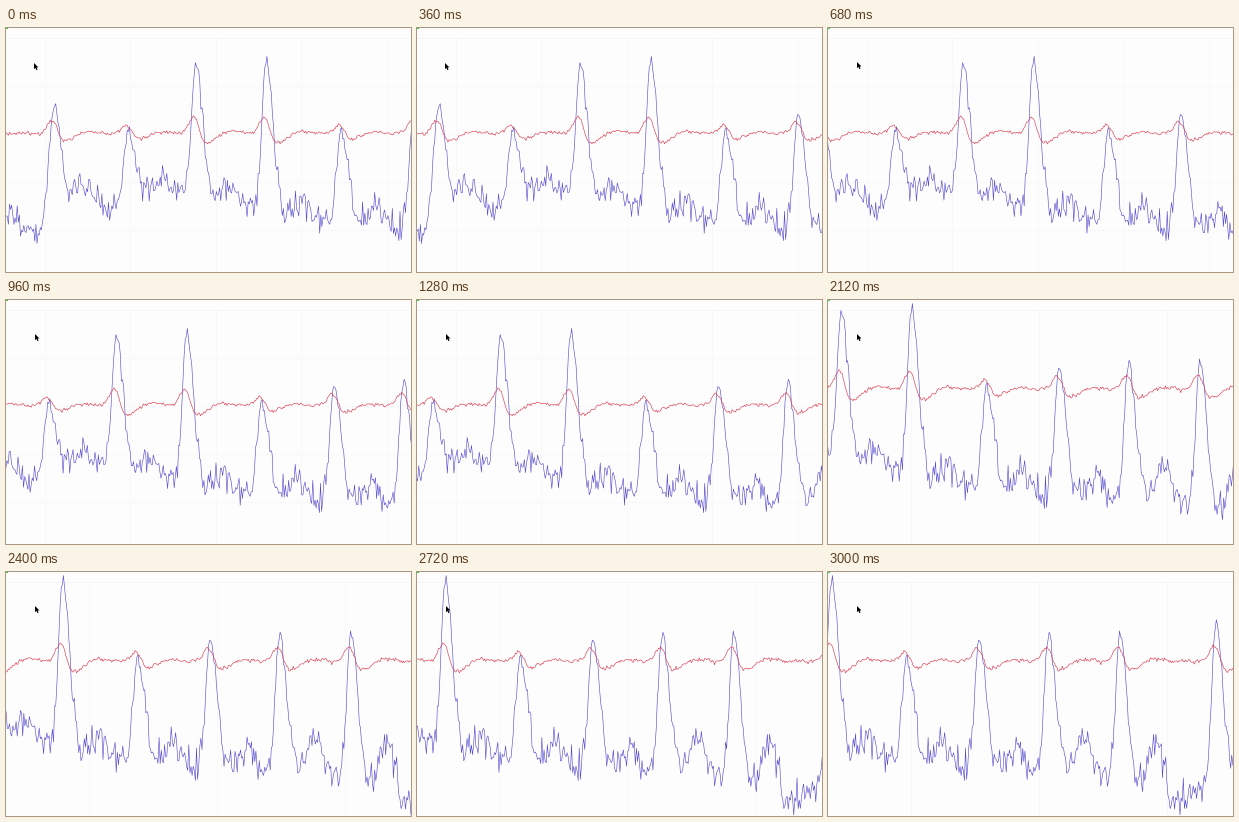
These frames come from a looping animation (405 px wide and 244 px high, 3040 ms). A matplotlib script:

```python
import numpy as np
import matplotlib.pyplot as plt
from matplotlib.animation import FuncAnimation
from matplotlib.patches import Polygon, Rectangle

W, H, DPI = 405, 244, 100
FRAMES, STEP = 76, 40
RESCALE_AT = 1400      # ms, vertical axis jumps to a tighter range
POINTER_AT = 680       # ms, pointer nudges by one pixel
PX = 72 / DPI
RED_LEVEL = 105.5

# Scroll distance over time (ms, px): a slightly uneven live feed
SCROLL = [(0, 0), (360, 26.5), (960, 79.5), (2120, 176.5), (2400, 203.5),
          (3040, 260)]
# Slow drift of the resting level (px, px)
FLOOR = [(0, 182), (34, 212), (42, 168), (75, 166), (103, 186), (135, 164),
         (205, 168), (280, 186), (430, 206), (540, 210), (592, 234), (664, 210)]
# Each beat: position and top of the blue peak
BEATS = [(48, 79), (122, 102), (189.5, 37), (260, 34), (335, 101),
         (407.5, 84), (477, 81), (548.5, 79), (644.5, 73)]


def curve(points, x):
    return np.interp(x, *np.transpose(points))


def bump(x, left, right):
    """Gaussian with separate widths before and after its centre."""
    return np.exp(-.5 * (x / np.where(x < 0, left, right)) ** 2)


def red_beat(x):
    return (bump(x, 5, 4.2) - .6 * bump(x - 11.5, 4, 9)
            + .16 * bump(x - 37, 8, 8))


rng = np.random.default_rng(12)
xs = np.arange(-2, 669, 1.1)
blue = curve(FLOOR, xs)
red = np.full_like(xs, RED_LEVEL)
pulse = np.zeros_like(xs)

# Small wave after each beat, growing with time
for cx, _ in BEATS:
    blue -= (12 + 40 * (cx / 548) ** 4) * bump(xs - cx - 36, 9, 8)

for cx, top in BEATS:
    p = bump(xs - cx, 4.2, 6.8)
    blue += (top - blue) * p
    pulse = np.maximum(pulse, p)
    red -= (16.5 - 8 * ((top - 34) / 68) ** 2) * red_beat(xs - cx + 1.5)

blue += rng.normal(0, 7.5, xs.size).clip(-17, 17) * (1 - .6 * pulse)
red += rng.normal(0, .9, xs.size)


def zoom(y):
    return 12 + 1.113 * (y - 36)


fig = plt.figure(figsize=(W / DPI, H / DPI), dpi=DPI, facecolor="#fdfdfd")
ax = fig.add_axes([0, 0, 1, 1])
ax.set_xlim(0, W)
ax.set_ylim(H, 0)
ax.axis("off")


def grid(first, gap, rows=()):
    style = dict(color="#f8f8fa", lw=PX, zorder=1)
    cols = np.arange(first, W, gap)
    return ([ax.plot([x + .5] * 2, [10, H], **style)[0] for x in cols]
            + [ax.plot([0, W], [y + .5] * 2, **style)[0] for y in rows])


ax.plot([0, W], [9.5, 9.5], color="#f5f5f6", lw=PX, zorder=1)
wide_grid = grid(38, 85.5, range(57, H, 48))
tight_grid = grid(82, 128)

blue_line, = ax.plot([], [], color="#5046cd", lw=.58 * PX, zorder=3)
red_line, = ax.plot([], [], color="#dc3c50", lw=.62 * PX, zorder=4)
ax.add_patch(Rectangle((0, 0), 2, 1, color="#30d030", lw=0, zorder=5))

ARROW = .88 * np.array([(0, 0), (0, 7), (1.6, 5.6), (2.8, 8.2), (4, 7.6),
                        (2.9, 5.2), (5, 5)])
pointer = Polygon(ARROW, closed=True, fc="black", lw=0, zorder=6)
ax.add_patch(pointer)


def draw(i):
    t = i * STEP
    x = xs - curve(SCROLL, t)
    tight = t >= RESCALE_AT
    for line, y in ((blue_line, blue), (red_line, red)):
        line.set_data(x, zoom(y) if tight else y)
    for line in wide_grid:
        line.set_visible(not tight)
    for line in tight_grid:
        line.set_visible(tight)
    pointer.set_xy(ARROW + ((29, 34) if t >= POINTER_AT else (28, 35)))
    return blue_line, red_line, pointer


anim = FuncAnimation(fig, draw, frames=FRAMES, interval=STEP,
                     repeat=True, repeat_delay=0, blit=False)
plt.show()
```
